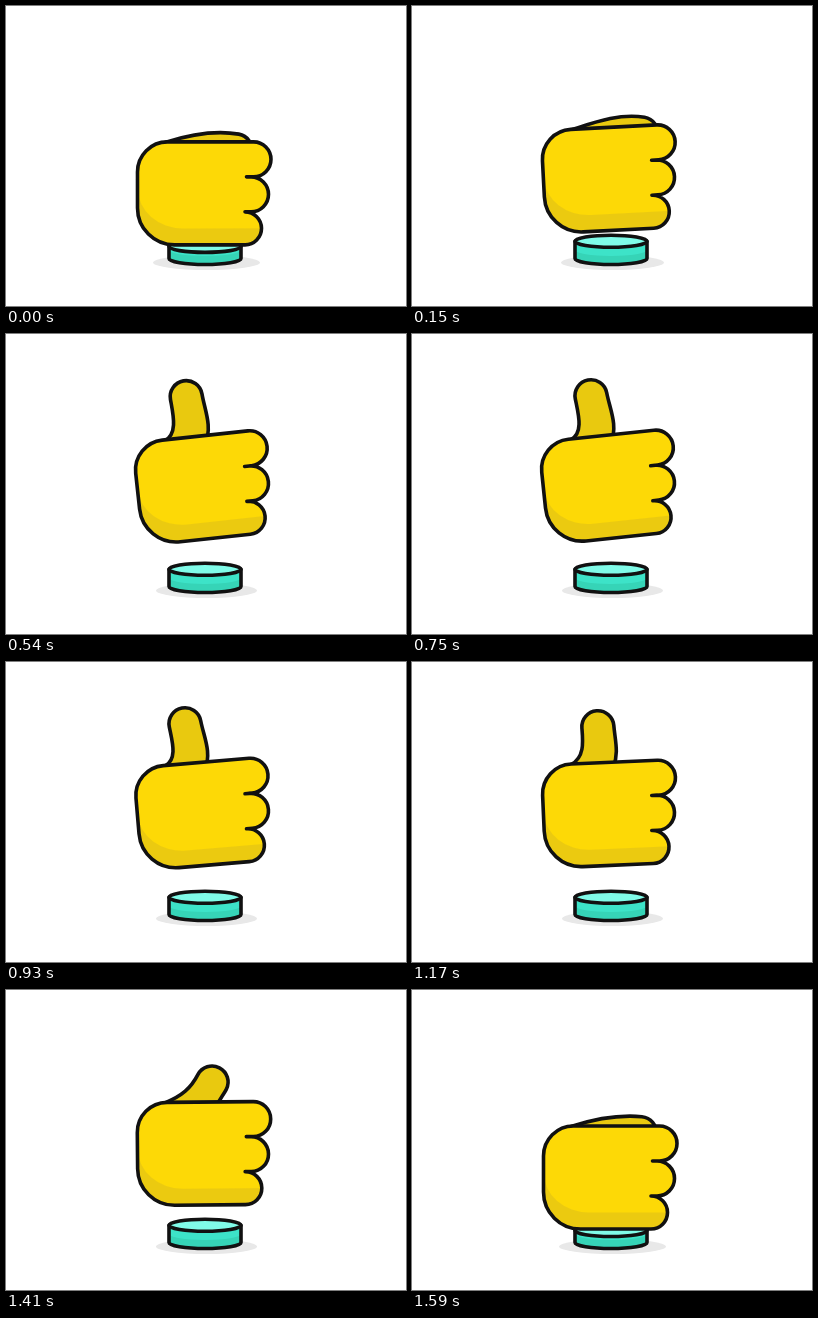
An HTML page for the animation above (1620 ms loop, 400 by 300 pixels).

```html
<!DOCTYPE html>
<html lang="en">
<head>
<meta charset="utf-8">
<title>Thumbs up button</title>
<style>
  html, body { margin: 0; width: 100%; height: 100%; overflow: hidden; background: #fff; }
  svg { display: block; width: 100%; height: 100%; }
  .line { stroke: #111; stroke-width: 3.6; stroke-linejoin: round; stroke-linecap: round; }
</style>
</head>
<body>
<svg viewBox="0 0 400 300">
  <defs>
    <path id="fist" d="M161.5 136H247.5a17.5 17.5 0 0 1 0 35H240.5H245a17.5 17.5 0 0 1 0 35H239a16.5 16.5 0 0 1 0 33H168.5a37 37 0 0 1-37-37V166a30 30 0 0 1 30-30z"/>
    <clipPath id="inside"><use href="#fist"/></clipPath>
  </defs>
  <ellipse id="shadow" cx="200.5" cy="256.5" ry="7.5" fill="#e8e8e8"/>
  <path id="side" fill="#3de3c8"/>
  <path d="M163 244A36 6 0 0 0 235 244V252.500A36 6 0 0 1 163 252.500z" fill="#36d4b7"/>
  <path id="rim" class="line" fill="none"/>
  <ellipse id="top" class="line" cx="199" rx="36" ry="6" fill="#80fbe8"/>
  <g id="hand">
    <path id="thumb" class="line" fill="#e9c90f"/>
    <g id="palm">
      <use href="#fist" fill="#ebca10"/>
      <path d="M120 120H280V222.500H177a45 39 0 0 1-45-39H120z" fill="#fdd906" clip-path="url(#inside)"/>
      <use href="#fist" class="line" fill="none"/>
    </g>
  </g>
</svg>
<script>
const LOOP = 1620, TIP = 16, RAD = Math.PI / 180;
const $ = id => document.getElementById(id);
const set = (id, name, value) => $(id).setAttribute(name, value);
const span = (t, from, to) => Math.min(1, Math.max(0, (t - from) / (to - from)));
const smooth = u => (1 - Math.cos(Math.PI * u)) / 2;
const easeOut = (u, power) => 1 - (1 - u) ** power;

// open: 0 = folded over the fist, 1 = upright
function thumbPath(open, turn) {
  const bulge = 5 * Math.sin(Math.PI * open * open);
  const x = 230 - 51 * open + bulge, y = 144 - 43 * open - bulge;
  const tilt = (100 - 111 * open - 12 * Math.sin(Math.PI * open)) * RAD;
  const c = Math.cos(tilt), s = Math.sin(tilt);
  const left = [x - TIP * c, y - TIP * s], right = [x + TIP * c, y + TIP * s];
  const leftBase = [159, 136.5 + 80 * Math.sin(turn * RAD)];
  const rightBase = [225 - 26 * open, Math.max(leftBase[1], right[1]) + 3];
  const reach = (p, q) => 0.35 * Math.hypot(p[0] - q[0], p[1] - q[1]);
  const below = (p, d) => [p[0] - s * d, p[1] + c * d];
  const dl = reach(left, leftBase), dr = reach(right, rightBase);

  return `M${leftBase}c${22 - 9 * open} -7 ${below(left, dl).map((v, i) => v - leftBase[i])} ${left.map((v, i) => v - leftBase[i])}`
    + `A${TIP} ${TIP} 0 0 1 ${right}`
    + `C${below(right, dr)} ${rightBase[0] + 0.4 * dr} ${rightBase[1] - dr} ${rightBase}z`;
}

function draw(now) {
  const t = now % LOOP;
  const lift = 39.2 * (easeOut(span(t, 0, 620), 2) - span(t, 920, 1585) ** 3.2);
  const turn = 6.2 * (easeOut(span(t, 0, 580), 2.2) - smooth(span(t, 640, 1590)));
  const open = smooth(span(t, 135, 575)) - span(t, 930, 1600) ** 2.4;
  const rim = Math.max(235.3, 240.5 - lift);
  const side = `M163 ${rim}V252.5A36 6 0 0 0 235 252.5V${rim}z`;

  set('shadow', 'rx', 50.5 + 3 * (1 - span(lift, 0, 25)));
  set('side', 'd', side);
  set('rim', 'd', side);
  set('top', 'cy', rim);
  set('hand', 'transform', `translate(0 ${-lift})`);
  set('palm', 'transform', `rotate(${-turn} 239.5 188.5)`);
  set('thumb', 'd', thumbPath(open, turn));
}

const start = performance.now();
function tick() {
  draw(performance.now() - start);
  requestAnimationFrame(tick);
}
tick();
</script>
</body>
</html>
```
